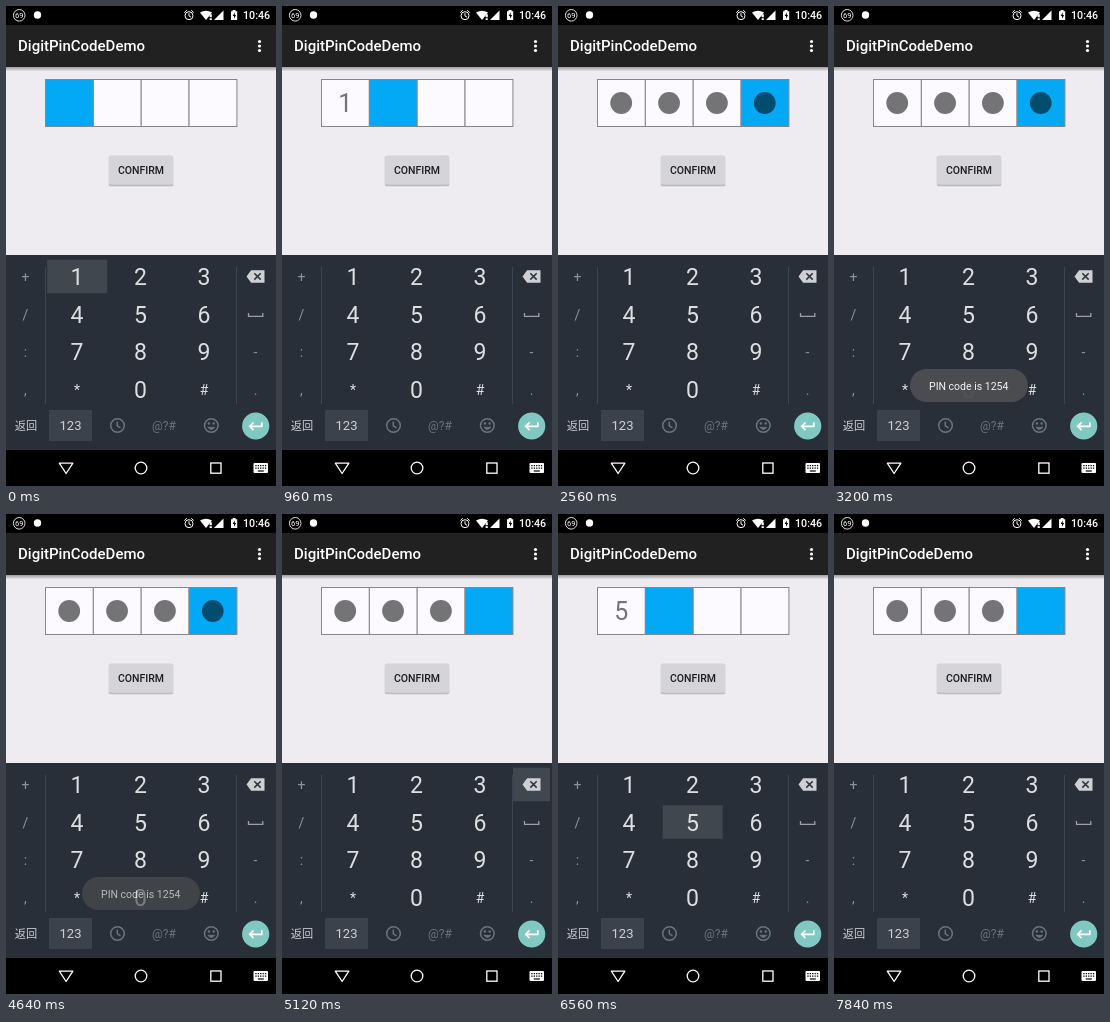
An HTML page that plays this animation: 270 px wide and 480 px high, repeating every 8 s.

```html
<!DOCTYPE html>
<html lang="en">
<head>
<meta charset="utf-8">
<title>Pin code entry</title>
<style>
  html, body { margin: 0; width: 100%; height: 100%; overflow: hidden; background: #000; }
  svg { display: block; width: 270px; height: 480px; font-family: Roboto, "Noto Sans", sans-serif; }
  .mid { text-anchor: middle; }
  .line { fill: none; stroke-width: 1.3; }
  .cjk { font-family: "Noto Sans CJK SC", "Noto Sans CJK", sans-serif; }
</style>
</head>
<body>
<svg viewBox="0 0 270 480">
  <defs>
    <linearGradient id="shade" x2="0" y2="1">
      <stop stop-color="#000" stop-opacity=".34"/>
      <stop offset="1" stop-color="#000" stop-opacity="0"/>
    </linearGradient>
  </defs>
  <rect width="270" height="480"/>

  <!-- status bar -->
  <g fill="#fff">
    <circle class="line" cx="13.2" cy="9.3" r="5.8" stroke="#ddd" style="stroke-width:1"/>
    <text class="mid" x="13.2" y="12.1" font-size="7.6">69</text>
    <circle cx="31.5" cy="9" r="3.7"/>
    <g class="line" stroke="#fff" style="stroke-width:1">
      <circle cx="183" cy="9.7" r="4"/>
      <path d="M183 7.2V10l2 1.2M178.3 6.5l2.5-2.2M187.7 6.5l-2.5-2.2"/>
    </g>
    <path d="M194 6.6Q200 2.8 206 6.6L200 14z"/>
    <path d="M203.6 8.3h2.2v3h-2.2zM203.6 12.2h2.2v1.8h-2.2z"/>
    <path d="M208 14L217.5 4.5V14z"/>
    <path d="M225 5.2h1.6V4h3v1.2h1.6V14H225z"/>
    <path d="M228.8 6.5l-2.2 3.6h1.4v2.7l2.2-3.8h-1.4z" fill="#000"/>
    <text x="237" y="13" font-size="10.7" font-weight="500">10:46</text>
  </g>

  <!-- app bar and page -->
  <rect y="61" width="270" height="188" fill="#eeecf0"/>
  <rect y="61" width="270" height="4.5" fill="url(#shade)"/>
  <rect y="19" width="270" height="42" fill="#212121"/>
  <text x="12" y="45.3" font-size="15" font-weight="500" fill="#fff">DigitPinCodeDemo</text>
  <g fill="#fff">
    <circle cx="253.5" cy="35.5" r="1.6"/><circle cx="253.5" cy="40" r="1.6"/><circle cx="253.5" cy="44.5" r="1.6"/>
  </g>
  <g id="cells"></g>
  <rect x="102.5" y="150" width="65" height="30.5" rx="2" fill="#000" opacity=".1"/>
  <rect x="103" y="150.5" width="64" height="29.3" rx="1.5" fill="#000" opacity=".16"/>
  <rect id="confirm" x="103" y="149.5" width="64" height="29.3" rx="1.5"/>
  <text class="mid" x="135" y="168" font-size="10.5" font-weight="500" fill="#1e1e1f">CONFIRM</text>

  <!-- keyboard -->
  <rect y="249" width="270" height="195" fill="#282f39"/>
  <path d="M39.5 261V398M230.5 261V398" stroke="#3d454e"/>
  <rect x="43" y="404" width="43" height="31" fill="#3b424b"/>
  <rect id="press" height="33.5" fill="#40474f"/>
  <g id="keys" class="mid"></g>
  <path d="M240.5 270.5l4.6-6.2h13.4v12.4h-13.4z" fill="#ced1d4"/>
  <path class="line" d="M248.3 267.2l6.4 6.4M254.7 267.2l-6.4 6.4" stroke="#30363f" style="stroke-width:1.6"/>
  <path class="line" d="M242.5 307v3.3h14.3V307" stroke="#9aa0a6"/>
  <text class="mid cjk" x="20" y="423.5" font-size="11.2" fill="#ced2d6">返回</text>
  <text class="mid" x="64.5" y="424" font-size="13" fill="#ced2d6">123</text>
  <text class="mid" x="158" y="423.5" font-size="12" fill="#6c747c">@?#</text>
  <g class="line" stroke="#6c747c" style="stroke-width:1.5">
    <circle cx="111.5" cy="419.5" r="6.8"/>
    <path d="M111.3 415.5v4.4l3.2 2"/>
    <circle cx="205.3" cy="419.5" r="6.8"/>
    <path d="M201.8 421.3q3.5 4.3 7 0z" fill="#6c747c" style="stroke-width:.8"/>
  </g>
  <g fill="#6c747c"><circle cx="202.9" cy="417.5" r="1.2"/><circle cx="207.7" cy="417.5" r="1.2"/></g>
  <circle cx="249.7" cy="420" r="13.6" fill="#80c8c1"/>
  <path class="line" d="M255.8 416.3v4H243.8M247.6 416.4l-3.9 3.9 3.9 3.9" stroke="#fff" style="stroke-width:1.7"/>

  <!-- navigation bar -->
  <g class="line" stroke="#fff">
    <path d="M53.3 457.2h13.6L60.1 467.5z" stroke-linejoin="round"/>
    <circle cx="135" cy="462" r="5.8"/>
    <rect x="204.8" y="457" width="10.2" height="10.2"/>
  </g>
  <rect x="247.5" y="457" width="14.5" height="10" rx="1" fill="#fff"/>
  <path d="M249.3 459.7h11M249.3 462.2h11" stroke="#000" stroke-width="1.3" stroke-dasharray="1.3 1.1"/>
  <path d="M251.8 465h6" stroke="#000" stroke-width="1.2"/>

  <g id="toast">
    <rect x="76" y="363" width="118" height="33" rx="16.5" fill="#4d4e51" opacity=".96"/>
    <text class="mid" x="134.7" y="383.6" font-size="10.5" fill="#f4f4f4">PIN code is 1254</text>
  </g>
</svg>
<script>
const LOOP = 8000, DOT = "•", BACK = "<";
const $ = id => document.getElementById(id);

function add(parent, tag, attrs, text = "") {
  const el = document.createElementNS("http://www.w3.org/2000/svg", tag);
  for (const name in attrs) el.setAttribute(name, attrs[name]);
  el.textContent = text;
  parent.append(el);
  return el;
}

const colX = [71, 134.5, 198];
const rowY = row => 271 + row * 37.6;
const pad = ["123", "456", "789", "*0#"];

pad.forEach((keys, row) => [...keys].forEach((key, col) => {
  const small = "*#".includes(key);
  add($("keys"), "text", {
    x: colX[col], y: rowY(row) + (small ? 5 : 8.2),
    "font-size": small ? 14 : 23, fill: "#dcdfe2"
  }, key);
}));
["+/:,", "  -."].forEach((keys, side) => [...keys].forEach((key, row) =>
  add($("keys"), "text", {
    x: side ? 249.5 : 19.5, y: rowY(row) + 5, "font-size": 14, fill: "#8b9299"
  }, key)));

const cells = [0, 1, 2, 3].map(i => {
  const x = 39.5 + i * 47.85, mid = x + 24;
  return {
    box: add($("cells"), "rect", { x, y: 73.5, width: 47.85, height: 47, stroke: "#85858a" }),
    dot: add($("cells"), "circle", { cx: mid - .3, cy: 97, r: 10.9, "fill-opacity": .54 }),
    digit: add($("cells"), "text", {
      x: mid - .3, y: 106, "font-size": 25, "fill-opacity": .54, class: "mid"
    })
  };
});

// time, entered code, pressed key
const steps = [
  [0, "", "1"], [800, "1", "1"], [960, "1", ""],
  [1120, "•", "2"], [1280, "•2", "2"], [1440, "•2", "5"],
  [1600, "••5", "5"], [1760, "••5", ""], [1920, "•••", "4"],
  [2080, "•••4", "4"], [2400, "••••", ""],
  [4960, "••••", BACK], [5120, "•••", BACK], [5280, "••", BACK],
  [5600, "•", BACK], [5920, "", ""],
  [6560, "5", "5"], [6720, "5", ""], [6880, "•5", "5"],
  [7200, "••", ""], [7520, "••5", "5"], [7680, "••5", ""], [7840, "•••", ""]
];
const toastSteps = [[0, 0], [2880, .35], [3040, .75], [3200, 1], [4640, .7], [4800, .3], [4960, 0]];

const at = (table, t) => table.findLast(step => step[0] <= t);

function drawPress(key) {
  const press = $("press");
  press.style.display = key ? "" : "none";
  if (!key) return;
  const row = key === BACK ? 0 : pad.findIndex(keys => keys.includes(key));
  const x = key === BACK ? 231 : colX[pad[row].indexOf(key)] - 29.8;
  press.setAttribute("x", x);
  press.setAttribute("y", rowY(row) - 17.3);
  press.setAttribute("width", key === BACK ? 37 : 60);
}

function draw(t) {
  const [, code, key] = at(steps, t);
  const focus = Math.min(code.length, 3);
  cells.forEach(({ box, dot, digit }, i) => {
    const value = code[i] || "";
    box.setAttribute("fill", i === focus ? "#03a9f4" : "#fcfafe");
    dot.style.display = value === DOT ? "" : "none";
    digit.textContent = value === DOT ? "" : value;
  });
  drawPress(key);
  $("confirm").setAttribute("fill", t >= 2720 && t < 2880 ? "#c4c3c7" : "#d5d4d8");
  $("toast").setAttribute("opacity", at(toastSteps, t)[1]);
}

const start = performance.now();
function tick() {
  draw((performance.now() - start) % LOOP);
  requestAnimationFrame(tick);
}
tick();
</script>
</body>
</html>
```
